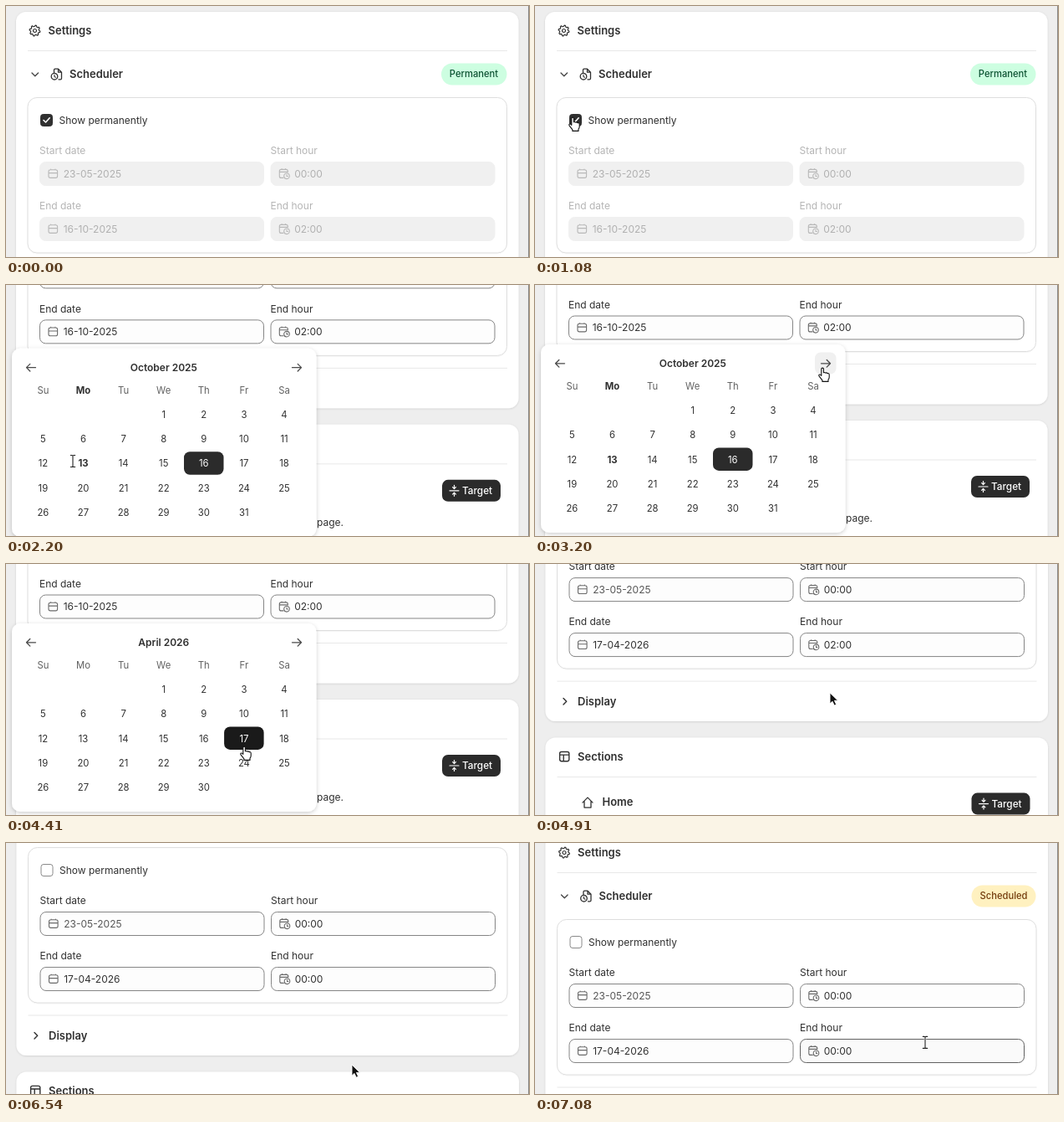
An HTML page for the animation above (7800 ms loop, 626 by 300 pixels).

```html
<!DOCTYPE html>
<html lang="en">
<head>
<meta charset="utf-8">
<title>Scheduler settings</title>
<style>
html, body { margin: 0; width: 100%; height: 100%; overflow: hidden; background: #eee; }
svg { display: block; width: 626px; height: 300px; }
text { font-family: Inter, "Open Sans", sans-serif; font-size: 12px; fill: #303030; white-space: pre; }
.b { font-size: 13px; font-weight: 600; }
.mid { text-anchor: middle; }
.line { fill: none; stroke-linecap: round; stroke-linejoin: round; }
</style>
</head>
<body>
<svg id="stage" viewBox="0 0 626 300" xmlns="http://www.w3.org/2000/svg"></svg>
<script>
const LOOP = 7800;
const INK = '#303030';
const stage = document.getElementById('stage');

function add(parent, tag, attrs = {}, content) {
  const el = document.createElementNS('http://www.w3.org/2000/svg', tag);
  for (const k in attrs) el.setAttribute(k, attrs[k]);
  if (content !== undefined) el.textContent = content;
  parent.appendChild(el);
  return el;
}
const set = (el, attrs) => { for (const k in attrs) el.setAttribute(k, attrs[k]); };
const show = (el, on) => el.setAttribute('display', on ? 'inline' : 'none');
const group = (p, x = 0, y = 0) => add(p, 'g', { transform: `translate(${x} ${y})` });
const rect = (p, x, y, width, height, rx, fill, stroke = 'none') =>
  add(p, 'rect', { x, y, width, height, rx, fill, stroke });
const line = (p, d, stroke = INK, w = 1.2) =>
  add(p, 'path', { d, class: 'line', stroke, 'stroke-width': w });
const label = (p, x, y, str, cls = '', attrs = {}) =>
  add(p, 'text', { x, y, class: cls, ...attrs }, str);

// ---- page ----
const defs = add(stage, 'defs');
const shadow = (id, dy, blur, alpha) => {
  const f = add(defs, 'filter', { id, x: '-10%', y: '-10%', width: '120%', height: '125%' });
  add(f, 'feDropShadow', { dx: 0, dy, stdDeviation: blur, 'flood-color': '#000', 'flood-opacity': alpha });
};
shadow('soft', 0.6, 0.8, 0.15);
shadow('faint', 0.5, 0.5, 0.07);
shadow('pop', 1.5, 2.5, 0.2);

rect(stage, 0, 0, 626, 300, 0, '#eee');
const page = group(stage);

function card(y, h) {
  set(rect(page, 12, y, 601.5, h, 12, '#fff'), { filter: 'url(#soft)' });
}
const rule = y => rect(page, 26, y, 574, 1, 0, '#e8e8e8');

card(7, 351);
card(377.5, 260);
rule(53);
rule(309.5);
rule(424);

function gear(x, y) {
  const g = group(page, x, y);
  let d = '';
  for (let i = 0; i < 32; i++) {
    const a = (i + 0.5) / 32 * Math.PI * 2;
    const r = i % 4 < 2 ? 6.4 : 5;
    d += `${i ? 'L' : 'M'}${(r * Math.cos(a)).toFixed(2)} ${(r * Math.sin(a)).toFixed(2)}`;
  }
  line(g, d + 'Z', INK, 1.2);
  add(g, 'circle', { r: 2, fill: 'none', stroke: INK, 'stroke-width': 1.2 });
}

function clockFile(x, y) {
  const g = group(page, x, y);
  line(g, 'M-3 -2V-5Q-3 -6.3 -1.7 -6.3H2L6 -2.3V5Q6 6.3 4.7 6.3H2.5M2 -6V-2.3H5.7', INK, 1.3);
  add(g, 'circle', { cx: -2.5, cy: 2.7, r: 3.8, fill: '#fff', stroke: INK, 'stroke-width': 1.3 });
  line(g, 'M-2.5 .8V3L-1 3.7', INK, 1.1);
}

gear(34.5, 29.5);
label(page, 50.5, 34, 'Settings', 'b');
line(page, 'M31 80L34.8 83.8L38.6 80', '#444', 1.3);
clockFile(60.5, 81.5);
label(page, 76, 86, 'Scheduler', 'b');

const badge = rect(page, 521, 68.5, 78.5, 26, 13, '#cdfee1');
const badgeText = label(page, 560, 85.4, 'Permanent', 'mid', { 'font-weight': 500 });
badgeText.style.fontSize = '11.2px';

set(rect(page, 26, 109.5, 573.5, 185.5, 11, '#fff', '#dedede'), { filter: 'url(#faint)' });
const box = rect(page, 41.5, 129.5, 14, 14, 3, '#fff', '#8a8a8a');
const tick = line(page, 'M45 136.5L47.5 139L52.2 133.8', '#fff', 1.6);
label(page, 63.5, 140.8, 'Show permanently');

function field(x, y, name, withClock, textColor) {
  const title = label(page, x, y - 8.6, name);
  const frame = rect(page, x + 0.5, y + 0.5, 268, 28, 7, '#fdfdfd', '#858585');
  const icon = group(page, x + 16.3, y + 14.4);
  const paths = withClock
    ? [line(icon, 'M-1 5H-3.5Q-5.5 5 -5.5 3V-3Q-5.5 -5 -3.5 -5H2.5Q4.5 -5 4.5 -3V-1.8M-5.5 -2H4.5M-2.7 -5.8V-5M1.8 -5.8V-5', INK, 1.1),
       line(icon, 'M6.5 2.9A3.3 3.3 0 1 1 -.1 2.9A3.3 3.3 0 1 1 6.5 2.9M3.2 1.3V3.1H4.6', INK, 1.1)]
    : [line(icon, 'M-3.2 -4.7H3.2Q5.3 -4.7 5.3 -2.6V2.9Q5.3 5 3.2 5H-3.2Q-5.3 5 -5.3 2.9V-2.6Q-5.3 -4.7 -3.2 -4.7M-5.3 -.8H5.3M-2.7 -5.4V-4.7M2.7 -5.4V-4.7', INK, 1.1)];
  const value = label(page, x + 28.7, y + 18.6, '');
  return (str, off, hover) => {
    title.style.fill = off ? '#b5b5b5' : INK;
    set(frame, { fill: off ? '#f0f0f0' : hover ? '#fafafa' : '#fdfdfd',
      stroke: off ? '#f0f0f0' : hover ? '#616161' : '#858585' });
    paths.forEach(p => p.setAttribute('stroke', off ? '#b8b8b8' : '#6a6a6a'));
    value.style.fill = off ? '#b0b0b0' : textColor;
    value.textContent = str;
  };
}
const startDate = field(40, 186, 'Start date', false, '#555');
const startHour = field(316.5, 186, 'Start hour', true, INK);
const endDate = field(40, 252, 'End date', false, INK);
const endHour = field(316.5, 252, 'End hour', true, INK);

line(page, 'M33.5 330.5L37.2 334.2L33.5 337.9', INK, 1.4);
label(page, 50.5, 338.7, 'Display', 'b');

const layout = group(page, 34.7, 400);
line(layout, 'M-3.5 -5.6H3.5Q5.6 -5.6 5.6 -3.5V3.5Q5.6 5.6 3.5 5.6H-3.5Q-5.6 5.6 -5.6 3.5V-3.5Q-5.6 -5.6 -3.5 -5.6M-5.6 -2H5.6M-1 -2V5.6', INK, 1.4);
label(page, 50.5, 404.6, 'Sections', 'b');
line(page, 'M56.5 455L62.5 449L68.5 455M58.5 453.5V461H66.5V453.5', INK, 1.3);
label(page, 80, 458.8, 'Home', 'b');
label(page, 404, 498.2, 'Choose where this section is displayed on your page.', '', { 'text-anchor': 'end' });
rect(page, 522, 443.5, 70, 26, 7, '#2b2b2b');
line(page, 'M531 456.5H542M536.5 450V454M536.5 459V463M534.6 452.2L536.5 454.2L538.4 452.2M534.6 460.8L536.5 458.8L538.4 460.8', '#fff', 1.2);
label(page, 546, 460.6, 'Target', '', { style: 'fill:#fff;font-weight:500;font-size:11.8px' });

// ---- calendar ----
const MONTHS = ['October 2025', 'November 2025', 'December 2025', 'January 2026',
  'February 2026', 'March 2026', 'April 2026'];
const DAYS = ['Su', 'Mo', 'Tu', 'We', 'Th', 'Fr', 'Sa'];
const colX = c => 44.4 + c * 48.1;
const rowY = r => 365.5 + r * 29.2;

const calendar = group(page);
const calBack = rect(calendar, 7, 286.5, 364.5, 225, 10, '#fff');
set(calBack, { filter: 'url(#pop)' });
const nextBack = rect(calendar, 335, 296, 25.5, 26, 7, '#f0f0f0');
line(calendar, 'M35.5 309.3H24.5M28.8 305L24.5 309.3L28.8 313.6', '#4a4a4a', 1.3);
line(calendar, 'M342.5 309.3H353.5M349.2 305L353.5 309.3L349.2 313.6', '#4a4a4a', 1.3);
const monthText = label(calendar, 188.8, 313.8, '', 'mid', { 'font-weight': 600 });
const heads = DAYS.map((d, i) => label(calendar, colX(i), 340.6, d, 'mid'));
heads.forEach(h => { h.style.fontSize = '11.3px'; });
const pick = rect(calendar, 0, 0, 47.5, 27.5, 7, '#2b2b2b');
const hoverCell = rect(calendar, 0, 0, 47.5, 27.5, 7, '#f0f0f0');
const cells = Array.from({ length: 42 }, (_, i) => {
  const t = label(calendar, colX(i % 7), rowY(Math.floor(i / 7)) + 4.1, '', 'mid');
  t.style.fontSize = '11.3px';
  return t;
});

function drawCalendar(month, x, y, active) {
  const first = new Date(2025, 9 + month, 1).getDay();
  const count = new Date(2025, 10 + month, 0).getDate();
  const rows = Math.ceil((first + count) / 7);
  const now = month === 0;
  const onNext = x > 335 && x < 361 && y > 296 && y < 322;
  const c = Math.round((x - colX(0)) / 48.1);
  const r = Math.round((y - rowY(0)) / 29.2);
  const over = active && c >= 0 && c < 7 && r >= 0 && r < rows ? r * 7 + c - first + 1 : 0;
  const chosen = now ? 16 : month === 6 && over === 17 ? 17 : 0;
  const place = (el, day) => {
    const i = day + first - 1;
    set(el, { x: colX(i % 7) - 23.8, y: rowY(Math.floor(i / 7)) - 14 });
  };

  calBack.setAttribute('height', 79 + rows * 29.2);
  show(nextBack, onNext);
  monthText.textContent = MONTHS[month];
  heads.forEach((h, i) => {
    h.style.fill = now && i === 1 ? INK : '#616161';
    h.style.fontWeight = now && i === 1 ? 700 : 400;
  });
  show(pick, chosen > 0);
  if (chosen) place(pick, chosen);
  pick.setAttribute('fill', over === chosen ? '#1a1a1a' : '#2b2b2b');
  const hovered = over > 0 && over <= count && over !== chosen;
  show(hoverCell, hovered);
  if (hovered) place(hoverCell, over);
  cells.forEach((t, i) => {
    const day = i - first + 1;
    t.textContent = day > 0 && day <= count ? day : '';
    t.style.fill = day === chosen ? '#fff' : INK;
    t.style.fontWeight = now && day === 13 ? 700 : 400;
  });
}

// ---- hour list ----
const HOURS = ['00:00', '00:30', '01:00', '01:30', '02:00', '02:30', '03:00'];
const hourY = i => 367.3 + i * 25.6;
const hourList = group(page);
set(rect(hourList, 364.5, 286, 200.5, 225, 9, '#fff'), { filter: 'url(#pop)' });
rect(hourList, 555.5, 287.5, 8, 52, 3.5, '#858585');
label(hourList, 379, 313.2, 'Select hour');
set(rect(hourList, 377.2, 320.3, 162, 31, 9, '#fff', '#1a4fc4'), { 'stroke-width': 2 });
rect(hourList, 379.5, 322.5, 157.5, 26.7, 7, '#f8f8f8', '#666');
label(hourList, 389.5, 340.3, 'Select time', '', { style: 'fill:#616161' });
const hours = HOURS.map((h, i) => label(hourList, 379, hourY(i) + 4.4, h));

// ---- cursors ----
rect(stage, 625, 0, 1, 300, 0, '#8a8a8a');
const pointer = group(stage);
const arrow = add(pointer, 'path', { d: 'M0 0V13.2L3 10.4L5.2 15.2L7.6 14.1L5.4 9.4H9.6Z',
  fill: '#111', stroke: '#fff', 'stroke-width': 0.9 });
const hand = add(pointer, 'path', {
  d: 'M-1.4 8.3V1Q-1.4 -.3 -.1 -.3Q1.2 -.3 1.2 1V5.4Q2.4 4.6 3.5 5.7Q4.8 5 5.9 6.3Q8 5.8 8 7.8V10.5Q8 12.4 6.8 13.7V16H-.3V14.5L-4 9.8Q-5 8.3 -3.7 7.7Q-2.6 7.3 -1.4 8.9Z',
  transform: 'translate(-.8 -.6)',
  fill: '#fff', stroke: '#111', 'stroke-width': 1.1, 'stroke-linejoin': 'round' });
const beam = add(pointer, 'g');
const beamPath = 'M-2.7 -7H-1Q0 -7 0 -6V6Q0 7 -1 7H-2.7M2.7 -7H1Q0 -7 0 -6V6Q0 7 1 7H2.7';
line(beam, beamPath, '#fff', 2.4);
line(beam, beamPath, '#222', 1.1);

// ---- motion: rows of [time, values...] ----
const SCROLL = [[0, 0], [1200, 0], [1740, 53.7], [1950, 53.7], [2230, 215.5], [4680, 215.5],
  [5040, 151], [6240, 151], [6540, 104], [6960, 18], [7800, 18]];
const CURSOR = [[330, 566, 41], [1040, 46, 134], [1200, 46, 134], [1830, 80, 197], [1910, 80, 208],
  [2410, 80, 212], [3120, 345, 100], [3990, 345, 100], [4250, 286, 219], [4640, 286, 219],
  [5100, 392, 116], [5200, 392, 118], [5430, 399, 231], [5600, 399, 231], [5820, 399, 274],
  [6100, 396, 215], [6200, 396, 215], [6540, 414, 265], [6960, 467, 238.4], [7800, 467, 238.4]];

function at(keys, t) {
  if (t <= keys[0][0]) return keys[0].slice(1);
  let i = 1;
  while (i < keys.length - 1 && t > keys[i][0]) i++;
  const a = keys[i - 1], b = keys[i];
  const u = Math.min(1, (t - a[0]) / (b[0] - a[0]));
  const e = u * u * (3 - 2 * u);
  return a.slice(1).map((v, k) => v + (b[k + 1] - v) * e);
}

function draw(t) {
  const scroll = at(SCROLL, t)[0];
  const [x, y] = at(CURSOR, t);
  const py = y + scroll;
  const drift = t >= 4620 ? 0.5 : 0;
  const off = t < 1120;
  const calOpen = t >= 1950 && t < 4620;
  const listOpen = t >= 5200 && t < 6200;

  page.setAttribute('transform', `translate(${drift} ${-scroll})`);
  set(badge, { x: off ? 521 : 522, width: off ? 78.5 : 77, fill: off ? '#cdfee1' : '#fff1c0' });
  badgeText.textContent = off ? 'Permanent' : 'Scheduled';
  badgeText.setAttribute('x', off ? 560 : 560.5);
  badgeText.style.fill = off ? '#0c5132' : '#733c0c';
  set(box, { fill: off ? INK : '#fff', stroke: off ? INK : '#8a8a8a' });
  show(tick, off);

  const free = !off && !calOpen && !listOpen;
  const inField = (fx, fy) => free && x > fx && x < fx + 269 && py > fy && py < fy + 28;
  const overs = [[40, 186], [316.5, 186], [40, 252], [316.5, 252]].map(p => inField(...p));
  startDate('23-05-2025', off, overs[0]);
  startHour('00:00', off, overs[1]);
  endDate(t < 4620 ? '16-10-2025' : '17-04-2026', off, overs[2]);
  endHour(t < 6200 ? '02:00' : '00:00', off, overs[3]);

  show(calendar, calOpen);
  if (calOpen) {
    const month = Math.max(0, Math.min(6, Math.floor((t - 3280) / 120) + 1));
    drawCalendar(month, x, py, t > 2410);
  }

  show(hourList, listOpen);
  let overHour = false;
  hours.forEach((h, i) => {
    const on = listOpen && x > 378 && x < 414 && Math.abs(py - hourY(i)) < 12.8;
    overHour = overHour || on;
    h.style.fill = on ? '#123f96' : '#2c5cc9';
    h.style.textDecoration = on ? 'underline' : 'none';
  });

  const overSearch = listOpen && py > 321 && py < 351;
  const overBox = t > 980 && t < 1300;
  const useHand = overBox || overHour || (calOpen && t > 2410);
  const useBeam = !useHand && (overs.includes(true) || overSearch || (t >= 1790 && t < 2410));
  show(pointer, t >= 330);
  pointer.setAttribute('transform', `translate(${x} ${y})`);
  show(hand, useHand);
  show(beam, useBeam);
  show(arrow, !useHand && !useBeam);
}

const begin = performance.now();
function tickFrame() {
  draw((performance.now() - begin) % LOOP);
  requestAnimationFrame(tickFrame);
}
draw(0);
requestAnimationFrame(tickFrame);
</script>
</body>
</html>
```
